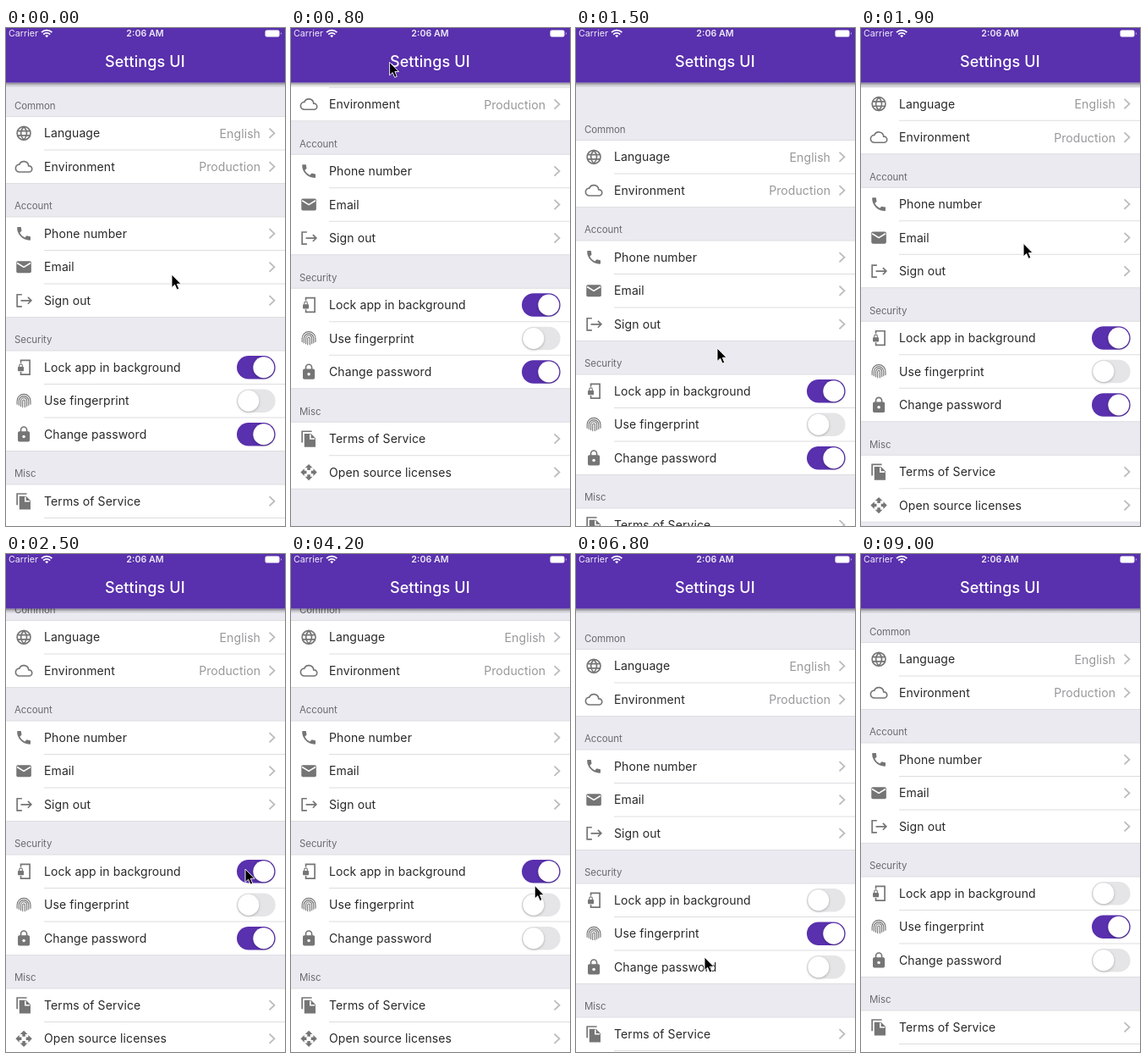
These frames come from a looping animation (330 by 588 pixels, 9.9 s). An HTML page:

```html
<!DOCTYPE html>
<html lang="en">
<head>
<meta charset="utf-8">
<title>Settings UI</title>
<style>
  html, body { margin: 0; width: 100%; height: 100%; overflow: hidden; background: #ebeaf1; }
  svg { display: block; width: 100vw; height: 100vh; font-family: Inter, Roboto, sans-serif; }
  .heading { font-size: 11.5px; letter-spacing: -.1px; fill: #6b6a70; }
  .label { font-size: 14px; letter-spacing: .1px; fill: #29292b; }
  .value { font-size: 14px; letter-spacing: .1px; fill: #98989b; text-anchor: end; }
  .icon { fill: #757575; stroke: #757575; stroke-width: 0; }
  .line { fill: none; stroke-width: 1.9; }
  .fine { fill: none; stroke-width: 1.3; stroke-linecap: round; }
  .cut { fill: none; stroke: #fff; stroke-width: 1.8; }
  .hole { fill: #fff; }
  .chevron { fill: none; stroke: #bcbcc0; stroke-width: 1.8; }
  .rule { stroke: #dddde1; }
  .thumb { fill: #fff; filter: drop-shadow(0 1.5px 1.5px rgba(0, 0, 0, .25)); }
  .status { font-size: 10.7px; fill: #fff; fill-opacity: .9; }
</style>
</head>
<body>
<svg viewBox="0 0 330 588">
  <defs>
    <linearGradient id="shade" x2="0" y2="1">
      <stop stop-color="#000" stop-opacity=".45"/>
      <stop offset=".5" stop-color="#000" stop-opacity=".15"/>
      <stop offset="1" stop-color="#000" stop-opacity="0"/>
    </linearGradient>
  </defs>
  <rect width="330" height="588" fill="#ebeaf1"/>
  <g id="list"></g>
  <rect y="64.5" width="330" height="6" fill="url(#shade)"/>
  <rect width="330" height="64.5" fill="#5930ad"/>
  <text class="status" x="3" y="10">Carrier</text>
  <g fill="none" stroke="#fff" stroke-width="1.8">
    <path d="M42 5.2a8.7 8.7 0 0 1 12.4 0M44.2 7.6a5.6 5.6 0 0 1 8 0"/>
    <path d="M48.2 11.2l-2-2.1a2.9 2.9 0 0 1 4 0Z" fill="#fff" stroke="none"/>
  </g>
  <text class="status" x="164.5" y="10" text-anchor="middle" font-weight="600">2:06 AM</text>
  <path d="M308.500 2.500h13a2 2 0 0 1 2 2v4a2 2 0 0 1-2 2h-13a2 2 0 0 1-2-2v-4a2 2 0 0 1 2-2ZM325 5q1.500 1.500 0 3Z" fill="#fff"/>
  <text x="164.300" y="46" font-size="18" letter-spacing=".1" font-weight="500" fill="#fff" text-anchor="middle">Settings UI</text>
  <path id="cursor" d="M0 0V15.500L3.600 12.200 6.100 18 8.700 16.900 6.300 11.200H11Z" stroke="#fff" stroke-width=".9"/>
</svg>
<script>
const PITCH = 39.5, FIRST_ROW = 104.5, LOOP = 9900, STEP = 100, FLIP_TIME = 200;

const line = (d, kind = 'line') => `<path class="${kind}" d="${d}"/>`;
const box = (x, y, width, height, rx) => `<rect x="${x}" y="${y}" width="${width}" height="${height}" rx="${rx}"/>`;

const icons = {
  globe: line('M3 12a9 9 0 0 1 18 0a9 9 0 0 1-18 0ZM12 3q-8 9 0 18q8-9 0-18M4 9h16M4 15h16'),
  cloud: line('M6 19a5 5 0 0 1 0-10A6.5 6.5 0 0 1 18.5 11H19a4 4 0 0 1 0 8Z'),
  phone: '<path d="M4 3h3.500q1 0 1 1q0 2 .6 3.600q.2.600-.3 1l-2.200 2.200q2.200 4.400 6.600 6.600l2.200-2.200q.4-.5 1-.3q1.600.600 3.600.600q1 0 1 1V20q0 1-1 1A17 17 0 0 1 3 4q0-1 1-1Z"/>',
  mail: box(2, 4, 20, 16, 2) + line('M3 6.500l9 5.500 9-5.500', 'cut'),
  exit: line('M9.5 4H3v16h6.5M8 12h13.5M17.5 7.5l4.500 4.500-4.500 4.500'),
  device: line('M8 6V2.5h12v19H8V18') + box(4, 11, 8, 6, 1) + line('M6 11V9.500a2 2 0 0 1 4 0V11', 'fine'),
  finger: [1.5, 4, 6.500, 9].map(r => line(`M${12 - r} ${21 - r / 2}V12a${r} ${r} 0 0 1 ${2 * r} 0v${9 - r / 2}`, 'fine')).join(''),
  lock: box(4, 8, 16, 14, 2) + line('M8 9V6a4 4 0 0 1 8 0v3') + '<circle class="hole" cx="12" cy="15" r="2"/>',
  pages: line('M3 17V2h13') + '<path d="M6 5h9l6 6v12H6Z"/>' + line('M14 6v6h6', 'cut'),
  arrows: [0, 90, 180, 270].map(turn => `<path d="M10 9h4V6h3l-5-5-5 5h3Z" transform="rotate(${turn} 12 12)"/>`).join('')
};

const sections = [
  ['Common', ['globe', 'Language', 'English'], ['cloud', 'Environment', 'Production']],
  ['Account', ['phone', 'Phone number'], ['mail', 'Email'], ['exit', 'Sign out']],
  ['Security',
    ['device', 'Lock app in background', { on: 1, flipAt: 4600 }],
    ['finger', 'Use fingerprint', { on: 0, flipAt: 5200 }],
    ['lock', 'Change password', { on: 1, flipAt: 3900 }]],
  ['Misc', ['pages', 'Terms of Service'], ['arrows', 'Open source licenses']]
];

// [time, offset] at the turning points of the drags and bounces
const scrollKeys = [
  [0, 0], [630, -85], [1500, 28], [2000, -42], [2400, -26], [5900, -26], [6400, 25], [6800, 8], [7200, 0]
];

// [time, x, y] where the pointer turns or rests
const cursorKeys = [
  [0, 196, 291], [630, 111, 3], [1500, 167, 378], [2000, 195, 240], [2500, 283, 372], [3000, 288, 375],
  [3300, 290, 408], [3800, 289, 450], [4400, 288, 371], [4700, 288, 371], [5100, 291, 407],
  [5500, 291, 409], [5900, 272, 437], [6800, 152, 476], [7200, 118, 610]
];

const list = document.getElementById('list');
const cursor = document.getElementById('cursor');
const switches = [];

function add(tag, attrs, content = '') {
  const node = document.createElementNS(list.namespaceURI, tag);
  for (const name in attrs) node.setAttribute(name, attrs[name]);
  node.innerHTML = content;
  return list.appendChild(node);
}

const rule = (x, y) => add('path', { class: 'rule', d: `M${x} ${y}H330` });

function addRow([icon, label, extra], y) {
  const mid = y + PITCH / 2;
  add('g', { class: 'icon', transform: `translate(10.5 ${mid - 10.5}) scale(.88)` }, icons[icon]);
  add('text', { class: 'label', x: 45, y: mid + 5 }, label);
  if (extra?.flipAt) {
    const track = add('rect', { x: 273, y: mid - 13.8, width: 45.6, height: 27.6, rx: 13.8 });
    const thumb = add('circle', { class: 'thumb', cy: mid, r: 12.5 });
    switches.push({ track, thumb, ...extra });
    return;
  }
  if (extra) add('text', { class: 'value', x: 301, y: mid + 5.5 }, extra);
  add('path', { class: 'chevron', d: `M311.5 ${mid - 5.7}l6 5.7-6 5.7` });
}

function addSection([heading, ...rows], y) {
  const height = rows.length * PITCH;
  add('text', { class: 'heading', x: 10, y: y - 8.6 }, heading);
  add('rect', { y, width: 330, height, fill: '#fff' });
  rows.forEach((row, i) => {
    rule(i ? 45 : 0, y + i * PITCH);
    addRow(row, y + i * PITCH);
  });
  rule(0, y + height);
  return y + height + PITCH;
}

sections.reduce((y, section) => addSection(section, y), FIRST_ROW);

const ease = u => u * u * (3 - 2 * u);
const clamp = u => Math.min(1, Math.max(0, u));

function sample(keys, t) {
  const next = keys.findIndex(key => key[0] > t);
  if (next < 0) return keys.at(-1).slice(1);
  const [start, ...from] = keys[next - 1];
  const [end, ...to] = keys[next];
  const u = ease((t - start) / (end - start));
  return from.map((value, i) => value + (to[i] - value) * u);
}

function setSwitch({ track, thumb, on, flipAt }, t) {
  const level = on + (1 - 2 * on) * ease(clamp((t - flipAt) / FLIP_TIME));
  const mix = (off, full) => Math.round(off + (full - off) * level);
  track.setAttribute('fill', `rgb(${mix(229, 89)},${mix(229, 48)},${mix(231, 173)})`);
  thumb.setAttribute('cx', 286.8 + 18 * level);
}

let origin;
function draw(now) {
  origin ??= now;
  const t = Math.floor((now - origin) % LOOP / STEP) * STEP;
  list.setAttribute('transform', `translate(0 ${sample(scrollKeys, t)})`);
  cursor.setAttribute('transform', `translate(${sample(cursorKeys, t)})`);
  switches.forEach(item => setSwitch(item, t));
  requestAnimationFrame(draw);
}
requestAnimationFrame(draw);
</script>
</body>
</html>
```
